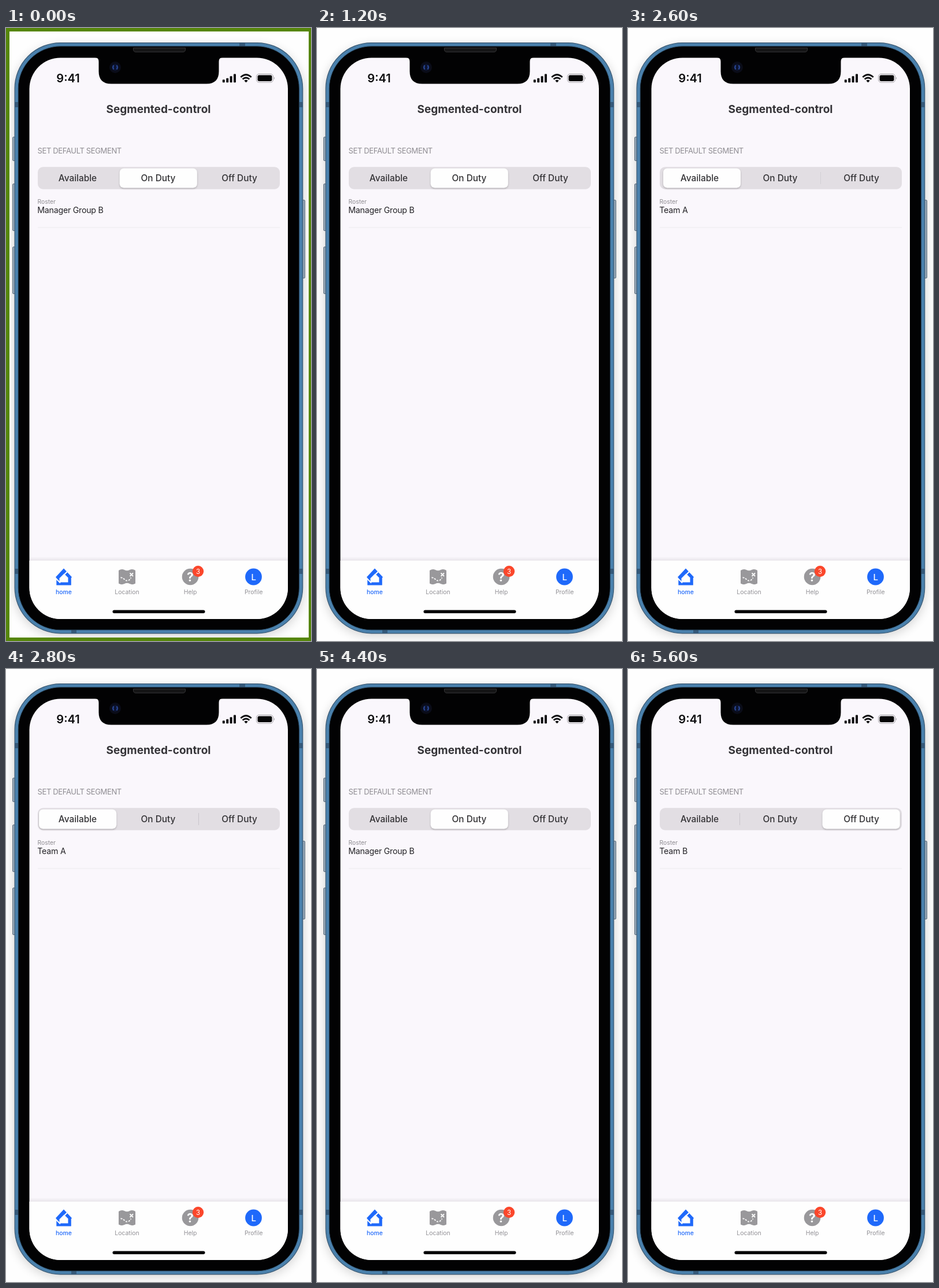
These frames come from a looping animation (528x1060 px, 8400 ms). An HTML page:

```html
<!DOCTYPE html>
<html lang="en">
<head>
<meta charset="utf-8">
<title>Segmented control</title>
<style>
  html, body { margin: 0; width: 100%; height: 100%; overflow: hidden; background: #fefefe; }
  svg { display: block; width: 528px; height: 1060px; }
  text { font-family: Inter, "Liberation Sans", sans-serif; }
  .mid { text-anchor: middle; }
  .seg { font-size: 15.4px; font-weight: 500; fill: #333235; }
  .tab { font-size: 10.4px; fill: #929196; }
  .btn { fill: #98a9b8; stroke: #5f6f7e; stroke-width: 1; }
  .band { fill: #35597a; }
</style>
</head>
<body>
<svg viewBox="0 0 528 1060" xmlns="http://www.w3.org/2000/svg">
  <defs>
    <filter id="glow" x="-10%" y="-10%" width="120%" height="120%">
      <feGaussianBlur stdDeviation="9"/>
    </filter>
    <filter id="soft" x="-10%" y="-30%" width="120%" height="170%">
      <feDropShadow dx="0" dy="1.5" stdDeviation="1.6" flood-color="#000" flood-opacity=".24"/>
    </filter>
    <linearGradient id="fade" x1="0" y1="0" x2="0" y2="1">
      <stop offset="0" stop-color="#000" stop-opacity="0"/>
      <stop offset="1" stop-color="#000" stop-opacity=".07"/>
    </linearGradient>
    <clipPath id="screen"><rect x="40.5" y="51.5" width="447.5" height="970.5" rx="54"/></clipPath>
  </defs>

  <rect width="528" height="1060" fill="#fefefe"/>
  <rect x="13" y="30" width="503" height="1022" rx="82" opacity=".16" filter="url(#glow)"/>

  <!-- phone body -->
  <g class="btn">
    <rect x="11.5" y="188.5" width="6" height="41" rx="1.5"/>
    <rect x="11.5" y="269.5" width="6" height="81" rx="1.5"/>
    <rect x="11.5" y="378.5" width="6" height="81" rx="1.5"/>
    <rect x="511.5" y="297.5" width="6" height="135" rx="1.5"/>
  </g>
  <rect x="15.2" y="25.7" width="498.4" height="1021" rx="79" fill="#4a81ad" stroke="#3f5f7a" stroke-width="1.4"/>
  <g class="band">
    <rect x="404" y="25.5" width="10" height="6"/>
    <rect x="113" y="1041" width="9" height="6"/>
    <rect x="15" y="128" width="6" height="9"/>
    <rect x="508" y="128" width="6" height="9"/>
    <rect x="15" y="935" width="6" height="9"/>
    <rect x="508" y="935" width="6" height="9"/>
  </g>
  <rect x="21.3" y="31.8" width="486" height="1009" rx="73" fill="#020203" stroke="#1f3446"/>

  <!-- screen -->
  <g clip-path="url(#screen)">
    <rect x="40" y="51" width="449" height="972" fill="#faf7fc"/>
    <rect x="40" y="914" width="449" height="7" fill="url(#fade)"/>
    <rect x="40" y="921" width="449" height="102" fill="#fefefe"/>
  </g>
  <path d="M154 51H375Q368.500 51 368.500 58V75Q368.500 96.500 347 96.500H182Q160.500 96.500 160.500 75V58Q160.500 51 154 51Z" fill="#020203"/>
  <path d="M220.500 34.500H310.500V37Q310.500 41.500 306 41.500H225Q220.500 41.500 220.500 37Z" fill="#151516" stroke="#343436"/>
  <circle cx="189" cy="68" r="10" fill="#0a0c18"/>
  <circle cx="189" cy="68" r="6" fill="#0c1430"/>
  <path d="M186.500 64.500q-2.500 3.500 0 7M191.500 64.500q2.500 3.500 0 7" fill="none" stroke="#2c4b9c" stroke-width="2"/>

  <!-- status bar -->
  <text class="mid" x="107.500" y="94" font-size="20" font-weight="600" fill="#0b0b0d">9:41</text>
  <g id="bars" fill="#0b0b0d"></g>
  <g fill="none" stroke="#0b0b0d" stroke-width="2.700">
    <path d="M406.300 85Q415.500 76.500 424.700 85"/>
    <path d="M409.600 88.600Q415.500 83.400 421.400 88.600"/>
  </g>
  <path d="M412.300 91Q415.500 88.300 418.700 91L415.500 94.300Z" fill="#0b0b0d"/>
  <rect x="433.500" y="79.500" width="29" height="14.500" rx="4.500" fill="none" stroke="#a3a1a5"/>
  <rect x="435.500" y="81.500" width="25" height="10.500" rx="2.700" fill="#060607"/>
  <path d="M464 84.500q2.200 2.200 0 4.800Z" fill="#a3a1a5"/>

  <!-- page -->
  <text class="mid" x="264" y="147" font-size="19" font-weight="700" fill="#343337">Segmented-control</text>
  <text x="54.500" y="217" font-size="13" letter-spacing="-.35" fill="#8e8c91">SET DEFAULT SEGMENT</text>

  <rect x="55" y="240.300" width="419" height="38.400" rx="9" fill="#e2dee3"/>
  <rect id="sepL" x="193" y="249" width="1" height="21" fill="#c9c5cb"/>
  <rect id="sepR" x="333" y="249" width="1" height="21" fill="#c9c5cb"/>
  <rect id="thumb" y="242.700" width="134" height="33.500" rx="7" fill="#fefefe" filter="url(#soft)"/>
  <text class="seg mid" x="124" y="265">Available</text>
  <text class="seg mid" x="263.500" y="265">On Duty</text>
  <text class="seg mid" x="404" y="265">Off Duty</text>

  <text x="54.500" y="303.700" font-size="10.400" fill="#8e8c91">Roster</text>
  <text id="roster" x="54.300" y="320" font-size="14.200" letter-spacing="-.25" fill="#232226"></text>
  <rect x="55" y="344.500" width="419" height="1" fill="#eeebf0"/>

  <!-- tab bar -->
  <path d="M86 949.500L100 934.500L114 949.500L112.800 951V963.500H87.300V951Z" fill="#1f69fa"/>
  <path d="M92.500 958.500V951.500L100.500 943.500L107.500 950.500V958.500Z" fill="#fefefe"/>
  <path d="M101 945L108 938M86 951.500L94 959.500" stroke="#fefefe" stroke-width="2"/>

  <path d="M195 938Q200 934.500 205 937Q209.500 939.500 214 937Q219 934.500 224 938V960.500Q219 963.500 214 961Q209.500 958.500 205 961Q200 963.500 195 960.500Z" fill="#99989b"/>
  <g fill="none" stroke="#fefefe" stroke-width="1.800">
    <path d="M198.500 950.500Q202 950 205 953.500T213.500 954.500L216.500 950.500" stroke-dasharray="3 2"/>
    <path d="M214.500 942.500l5.500 5.500m0 -5.500l-5.500 5.500"/>
  </g>

  <circle cx="319" cy="949" r="14.300" fill="#99989b"/>
  <text class="mid" x="319" y="956.500" font-size="21" font-weight="700" fill="#fefefe">?</text>
  <circle cx="332.500" cy="939.500" r="9.700" fill="#fb472b"/>
  <text class="mid" x="332.500" y="943.500" font-size="11.500" fill="#fff">3</text>

  <circle cx="428.500" cy="949" r="14.400" fill="#1f69fa"/>
  <text class="mid" x="428.800" y="954.500" font-size="15" font-weight="500" fill="#fff">L</text>

  <text class="tab mid" x="100" y="978.500" style="fill:#1f69fa;font-weight:500">home</text>
  <text class="tab mid" x="209.500" y="978.500">Location</text>
  <text class="tab mid" x="319" y="978.500">Help</text>
  <text class="tab mid" x="428.700" y="978.500">Profile</text>
  <rect x="184.500" y="1006.500" width="160" height="5.500" rx="2.750" fill="#040405"/>

  <path id="border" d="M0 0H528V1060H0ZM6 6V1054H524V6Z" fill="#56860a" fill-rule="evenodd"/>
</svg>
<script>
  const LOOP = 8400;
  const $ = id => document.getElementById(id);
  const GROUP = "Manager Group B";

  // start ms, thumb x, roster, left and right separator opacity
  const poses = [
    [0, 196.8, GROUP, 0, 0],
    [2400, 177, GROUP, 0, 0],
    [2600, 61, "Team A", 0, 0.6],
    [2800, 57.1, "Team A", 0, 1],
    [4000, 167.3, GROUP, 0, 0.4],
    [4200, 196, GROUP, 0, 0],
    [4400, 196.8, GROUP, 0, 0],
    [5200, 314, "Team B", 0.2, 0],
    [5400, 336, "Team B", 0.9, 0],
    [5600, 336.7, "Team B", 1, 0]
  ];

  $("bars").innerHTML = [5, 7.5, 11, 14.7].map((h, i) =>
    `<rect x="${374.8 + i * 6.4}" y="${94.2 - h}" width="4" height="${h}" rx="1"/>`).join("");

  function draw(ms) {
    const t = ms % LOOP;
    const [, x, name, left, right] = poses.findLast(p => p[0] <= t);
    $("thumb").setAttribute("x", x);
    $("sepL").setAttribute("opacity", left);
    $("sepR").setAttribute("opacity", right);
    if ($("roster").textContent !== name) $("roster").textContent = name;
    $("border").setAttribute("visibility", t < 200 ? "visible" : "hidden");
  }

  function tick() {
    draw(performance.now());
    requestAnimationFrame(tick);
  }
  tick();
</script>
</body>
</html>
```
